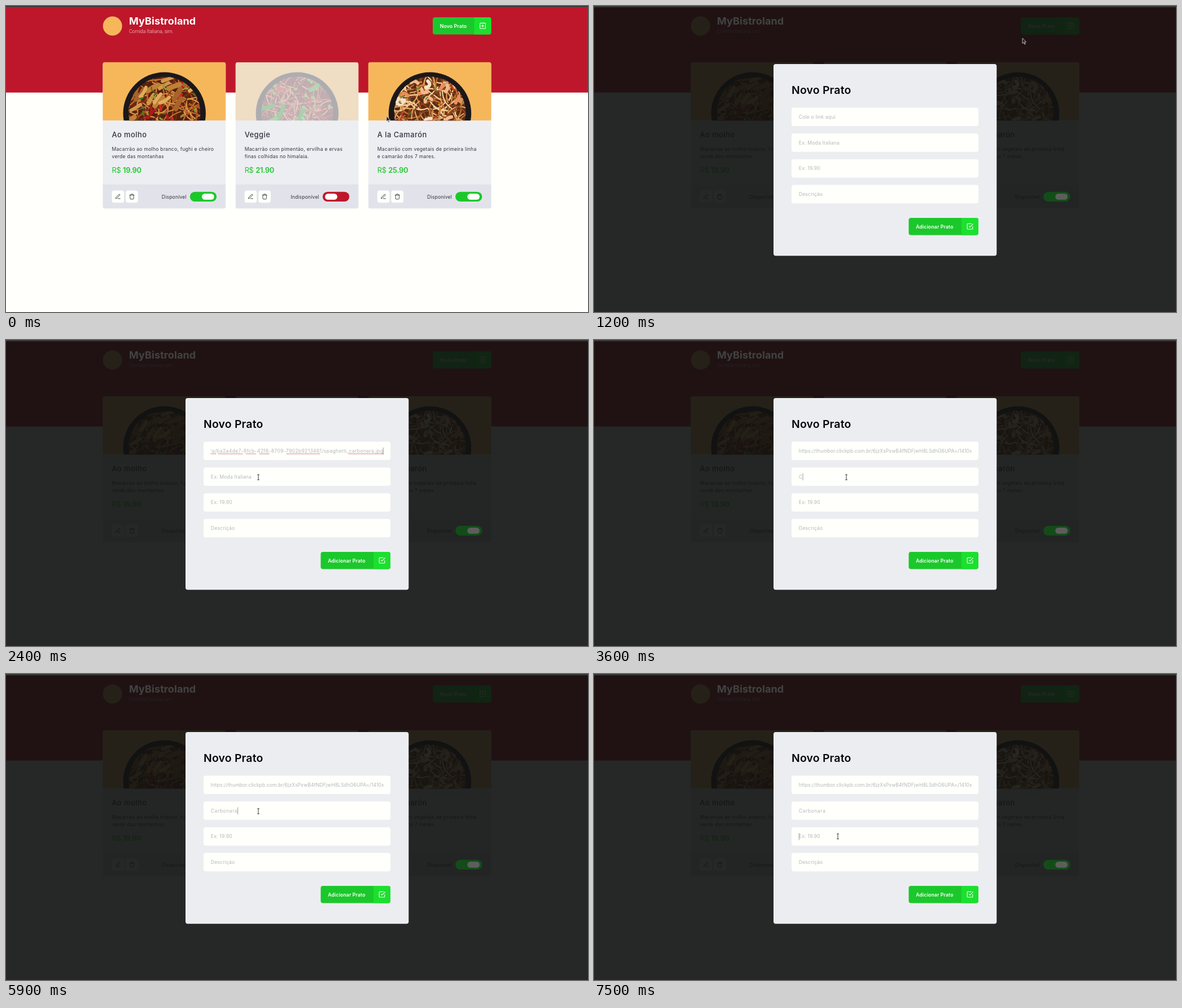
These frames come from a looping animation (1031 by 543 pixels, 8000 ms). An HTML page:

```html
<!DOCTYPE html>
<html lang="pt-BR">
<head>
<meta charset="utf-8">
<title>Novo Prato</title>
<style>
  html, body { margin: 0; height: 100%; overflow: hidden; background: #fffffb; }
  svg { display: block; width: 100%; height: 100%; }
  text { font-family: Inter, "Open Sans", sans-serif; white-space: pre; }
  .icon { fill: none; stroke-linecap: round; stroke-linejoin: round; }
</style>
</head>
<body>
<svg id="stage" viewBox="0 0 1031 543"></svg>
<script>
const GREEN = '#1bc82b', LIME = '#1be02e', RED = '#be172b', INK = '#34343f',
      PAPER = '#fffffb', GREY = '#b6b7be';
const STEP = 45.7; // distance between form fields

const rect = (x, y, w, h, fill, r = 0, more = '') =>
  `<rect x="${x}" y="${y}" width="${w}" height="${h}" rx="${r}" fill="${fill}" ${more}/>`;

const text = (x, y, str, { size = 8.6, weight = 400, fill = INK, gap = .02, more = '' } = {}) =>
  `<text x="${x}" y="${y}" font-size="${size}" font-weight="${weight}" fill="${fill}" letter-spacing="${gap}em" ${more}>${str}</text>`;

const icon = (cx, cy, size, color, d) =>
  `<path class="icon" stroke="${color}" stroke-width="2" d="${d}"
    transform="translate(${cx - size / 2} ${cy - size / 2}) scale(${size / 24})"/>`;

const ICONS = {
  pencil: 'M12 20h9M16.5 3.5a2.1 2.1 0 0 1 3 3L7 19l-4 1 1-4Z',
  trash: 'M3 6h18M19 6v14a2 2 0 0 1-2 2H7a2 2 0 0 1-2-2V6M8 6V4a2 2 0 0 1 2-2h4a2 2 0 0 1 2 2v2',
  plus: 'M5 3h14a2 2 0 0 1 2 2v14a2 2 0 0 1-2 2H5a2 2 0 0 1-2-2V5a2 2 0 0 1 2-2ZM12 8v8M8 12h8',
  check: 'M9 11l3 3L22 4M21 12v7a2 2 0 0 1-2 2H5a2 2 0 0 1-2-2V5a2 2 0 0 1 2-2h11'
};

function button(x, y, w, label, glyph) {
  return rect(x, y, w, 30.5, GREEN, 4) +
    `<path fill="${LIME}" d="M${x + w - 30} ${y}h26a4 4 0 0 1 4 4v22.5a4 4 0 0 1-4 4h-26Z"/>` +
    text(x + 12.8, y + 18.5, label, { weight: 600, fill: '#fff', gap: .018 }) +
    icon(x + w - 15, y + 15.2, 12.9, '#fff', glyph);
}

function toggle(on) {
  return rect(325.8, 329.7, 47.3, 17.2, on ? GREEN : RED, 8.6) +
    rect(on ? 347 : 330, 333, 21.7, 10.7, PAPER, 5.3);
}

// Layers of short random strokes: [count, colours, width, length, bend, tilt]
function food(seed, base, ...layers) {
  const rnd = () => (seed = seed * 16807 % 2147483647) / 2147483647;
  let out = '';
  for (const [count, colors, width, length, curl = 1, tilt] of layers)
    for (let i = 0; i < count; i++) {
      const x = 220 + rnd() * 122, y = 127 + rnd() * 80;
      const a = tilt === undefined ? rnd() * 6.28 : tilt + rnd() - .5;
      const dx = Math.cos(a) * length, dy = Math.sin(a) * length, bend = (rnd() - .5) * curl;
      out += `<path stroke="${colors[i % colors.length]}" stroke-width="${width}"
        d="M${x - dx / 2} ${y - dy / 2}q${dx / 2 - dy * bend} ${dy / 2 + dx * bend} ${dx} ${dy}"/>`;
    }
  return `<circle cx="280.7" cy="190.7" r="73.2" fill="#1b181a"/>
    <g class="icon" clip-path="url(#bowl)">${rect(215, 120, 132, 90, base)}${out}</g>`;
}

const dishes = [
  { name: 'Ao molho', price: '19.90', on: true,
    lines: ['Macarrão ao molho branco, fughi e cheiro', 'verde das montanhas'],
    food: food(77, '#54200f',
      [120, ['#c8742d', '#a24c1b', '#dc9646', '#6f2a12'], 2, 34],
      [9, ['#b5161b', '#cf2a1e'], 4, 20],
      [9, ['#a8642a', '#c08037'], 9, 20, .4, -.8], [9, ['#e0ac5c', '#d2974a'], 6, 19, .4, -.8],
      [18, ['#3f7a24', '#7ea53c'], 2.6, 5]) },
  { name: 'Veggie', price: '21.90', on: false,
    lines: ['Macarrão com pimentão, ervilha e ervas', 'finas colhidas no himalaia.'],
    food: food(431, '#5a1d1c',
      [140, ['#b05a3e', '#8c3129', '#cc8460', '#642022'], 2, 34],
      [6, ['#b8222a'], 3, 16],
      [5, ['#0f8a16', '#2ba522'], 7, 24, .4, -.7], [14, ['#4fae2e'], 5, 1]) },
  { name: 'A la Camarón', price: '25.90', on: true,
    lines: ['Macarrão com vegetais de primeira linha', 'e camarão dos 7 mares.'],
    food: food(1913, '#5e2a14',
      [130, ['#e2a862', '#c27432', '#f4d7a2', '#8a4520'], 2.1, 34],
      [7, ['#c2361f', '#d9822b'], 3, 16],
      [14, ['#e8905a', '#f3b98c', '#fae0c8'], 6, 12, 3], [12, ['#5c8a2c'], 2, 5]) }
];

function card(dish, i) {
  const { name, price, on, lines, food } = dish;
  return `<g transform="translate(${i * 235.15} 0)"><g clip-path="url(#card)">
    ${rect(171, 100, 219, 217, '#edeef2')}
    <g opacity="${on ? 1 : .3}" clip-path="url(#photo)">${rect(171, 99, 219, 104.3, '#f6b75b')}${food}</g>
    ${rect(171, 316.7, 219, 43, '#e2e3ea')}</g>
    ${text(187.5, 233.4, name, { size: 12.9, weight: 500, gap: .035 })}
    ${lines.map((l, n) => text(187.5, 256.7 + n * 13.5, l, { gap: .03 })).join('')}
    ${text(187.5, 295.6, 'R$', { size: 12.9, fill: GREEN, gap: -.03 })}
    ${text(207, 295.6, price, { size: 12.9, weight: 600, fill: GREEN, gap: -.02 })}
    ${rect(187.5, 327.5, 21.5, 21.5, PAPER, 4)}${icon(198.2, 338.2, 10.8, INK, ICONS.pencil)}
    ${rect(212.2, 327.5, 21.5, 21.5, PAPER, 4)}${icon(223, 338.2, 10.8, INK, ICONS.trash)}
    ${text(319.7, 341.5, on ? 'Disponível' : 'Indisponível', { more: 'text-anchor="end"' })}
    ${toggle(on)}</g>`;
}

const brand = text(218, 33.3, 'MyBistroland', { size: 18, weight: 700, fill: '#fff', gap: .005 });
const misspelt = [[363, 9], [376, 44], [425, 18], [449, 18], [497, 59], [607, 61]]
  .map(([x, w]) => `M${x} 202h${w}`).join('');

stage.innerHTML = `
  <defs>
    <clipPath id="card">${rect(171.5, 99.8, 217.7, 259.8, '#000', 4)}</clipPath>
    <clipPath id="photo">${rect(171, 99, 219, 104.3, '#000')}</clipPath>
    <clipPath id="bowl"><circle cx="280.7" cy="189" r="63.5"/></clipPath>
    <clipPath id="field">${rect(362.8, 181, 306, 31, '#000')}</clipPath>
  </defs>
  ${rect(0, 0, 1031, 543, PAPER)}
  ${rect(0, 0, 1031, 153.6, RED)}
  <circle cx="188.7" cy="35.5" r="17" fill="#f6b75b"/>
  ${brand}
  ${text(218, 48.3, 'Comida Italiana, sim.', { weight: 300, fill: '#f8e4e2', gap: 0, more: 'style="font-family:Roboto,sans-serif"' })}
  ${button(756, 20, 103.5, 'Novo Prato', ICONS.plus)}
  ${dishes.map(card).join('')}
  <g id="modal">
    ${rect(0, 0, 1031, 543, '#101211', 0, 'opacity=".905"')}
    <g opacity=".12">${brand}</g>
    <g opacity=".25" transform="translate(470.3 0)">${toggle(true)}</g>
    ${rect(318, 103, 395.3, 340.2, '#ecedf1', 4)}
    ${text(350, 155.7, 'Novo Prato', { size: 19.35, weight: 600, fill: '#050507', gap: .012 })}
    ${[0, 1, 2, 3].map(i => rect(350, 180.5 + i * STEP, 331, 32.6, PAPER, 4)).join('')}
    ${text(362.8, 200, 'Cole o link aqui', { fill: GREY, more: 'id="hint"' })}
    <g clip-path="url(#field)">
      ${text(362.8, 200, 'https://thumbor.clickpb.com.br/6jzXsPxwB4fNDFjwH8LSdhG6UPA=/1410x', { fill: GREY, gap: .01, more: 'id="linkHead"' })}
      <g id="linkTail">
        ${text(668.5, 200, '2a/ba2a4de7-8fcb-42f8-8709-7902b9213461/spaghetti_carbonara.jpg', { fill: GREY, gap: .037, more: 'text-anchor="end"' })}
        <path d="${misspelt}" stroke="#d8303a" stroke-width="1.2" stroke-dasharray="1.2 .8"/>
      </g>
    </g>
    ${text(362.8, 200 + STEP, 'Ex: Moda Italiana', { fill: GREY, more: 'id="nameHint"' })}
    ${text(362.8, 200 + STEP, '', { fill: GREY, gap: .06, more: 'id="typed"' })}
    ${text(362.8, 200 + STEP * 2, 'Ex: 19.90', { fill: GREY })}
    ${text(362.8, 200 + STEP * 3, 'Descrição', { fill: GREY })}
    ${button(557.5, 376, 123.5, 'Adicionar Prato', ICONS.check)}
    ${rect(0, 0, .8, 12.5, '#85868c', 0, 'id="caret"')}
  </g>
  ${rect(0, 0, 1031, 1, '#272827')}${rect(0, 1, 1031, 1, '#4d4b49')}
  <g id="pointer">
    <path id="arrow" fill="#1f1f22" stroke="#dcdcdc" stroke-width=".8" d="M0 0V9.5L2.2 7.4 3.8 11 5.2 10.4 3.7 6.9H6.6Z"/>
    <path id="beam" class="icon" stroke="#3c3c40" stroke-width="1" d="M-1.5-4.5h3M0-4.5v9M-1.5 4.5h3"/>
  </g>`;

// Pointer path: [ms, x, y]
const path = [
  [0, 674, 195.5], [300, 714, 180], [400, 714, 180], [500, 697, 191], [600, 732, 136],
  [700, 783, 62], [800, 802, 39], [900, 802, 39], [1000, 803, 39], [1100, 803, 39],
  [1200, 759, 57], [1600, 455, 190], [1700, 447, 197], [2000, 447, 197], [2400, 447, 243.5],
  [6900, 447, 243.5], [7400, 432, 288.2], [8000, 432, 288.2]
];
// Letters typed so far: [ms, count]
const keys = [[3600, 1], [3800, 2], [4000, 3], [4100, 4], [4500, 6], [5200, 7], [5900, 9]];

function pointerAt(t) {
  const i = path.findIndex(p => p[0] > t), a = path[i - 1], b = path[i];
  const k = (t - a[0]) / (b[0] - a[0]);
  return [a[1] + (b[1] - a[1]) * k, a[2] + (b[2] - a[2]) * k];
}

const el = id => document.getElementById(id);
const show = (id, on) => el(id).style.display = on ? '' : 'none';

function draw(t) {
  const [x, y] = pointerAt(t);
  const open = t >= 1200;
  const inField = open && x > 350 && x < 681 && y > 180 && (y - 180.5) % STEP < 32.6;
  el('pointer').setAttribute('transform', `translate(${x} ${y})`);
  show('arrow', !inField);
  show('beam', inField);
  show('modal', open);
  show('hint', t < 2000);
  show('linkTail', t >= 2000 && t < 3000);
  show('linkHead', t >= 3000);
  show('nameHint', t < 3600);

  const count = keys.reduce((n, [ms, c]) => t >= ms ? c : n, 0);
  el('typed').textContent = 'Carbonara'.slice(0, count);
  const row = t < 3000 ? 0 : t < 7500 ? 1 : 2;
  const end = row === 0 ? (t >= 2000 ? 305 : 0)
    : row === 1 && count ? el('typed').getComputedTextLength() : 0;
  el('caret').setAttribute('x', 362.8 + end);
  el('caret').setAttribute('y', 190.8 + row * STEP);
  show('caret', t >= 1700);
}

const start = performance.now();
function tick() {
  const t = (performance.now() - start) % 8000;
  draw(Math.floor(t / 100) * 100);
  requestAnimationFrame(tick);
}
tick();
</script>
</body>
</html>
```
